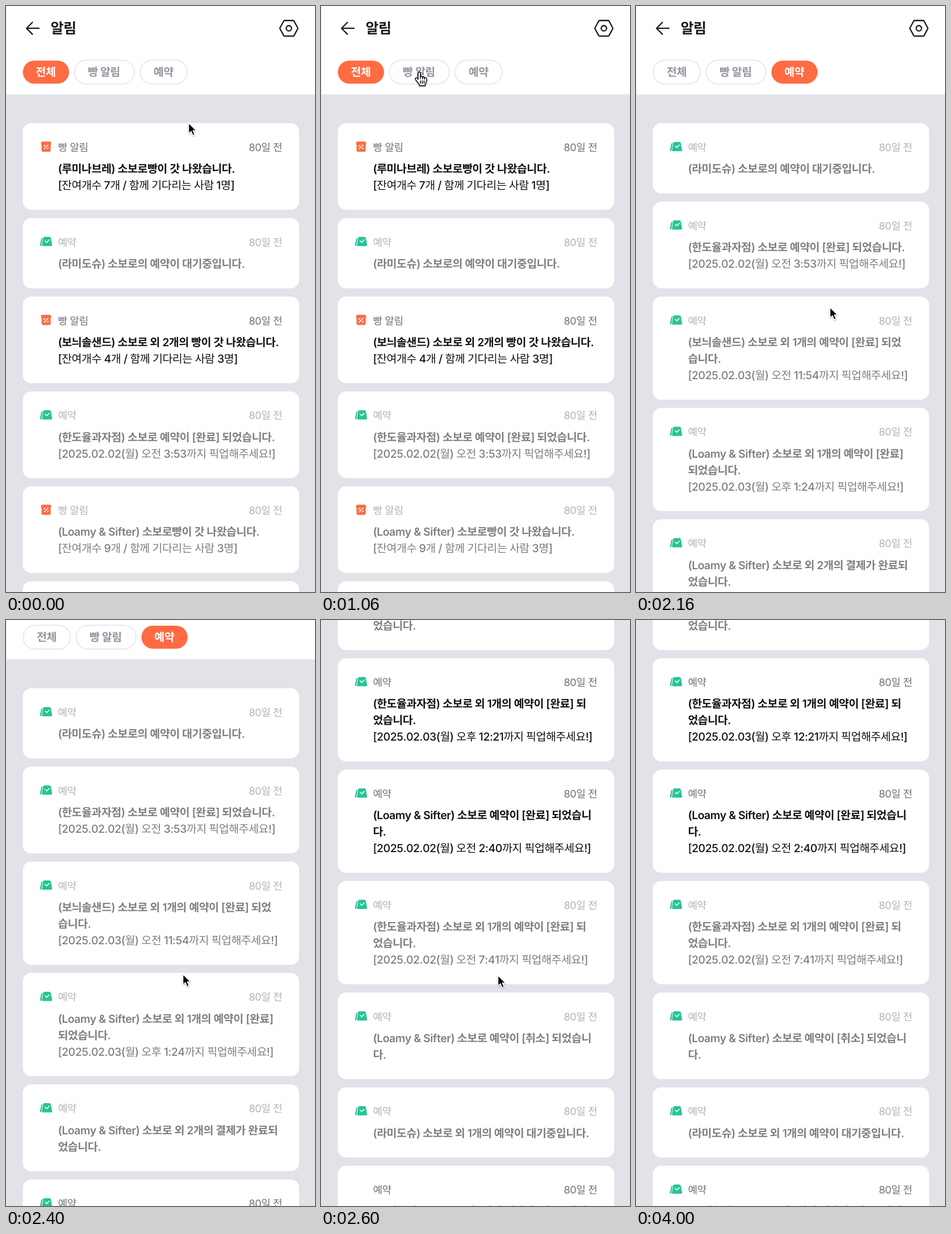
Recreate the animation shown at these times as an HTML page. Size 544 by 1030 pixels, loop 4.04 s.

```html
<!DOCTYPE html>
<html lang="ko">
<head>
<meta charset="utf-8">
<title>알림</title>
<style>
  html, body { margin: 0; width: 100%; height: 100%; overflow: hidden; background: #e2e3e9; }
  svg { display: block; }
  text {
    font-family: Inter, "Noto Sans CJK KR", "Noto Sans CJK", sans-serif;
    font-size: 19.5px; font-weight: 500; letter-spacing: -.0256em; font-kerning: none;
    text-rendering: geometricPrecision; white-space: pre; fill: #111;
  }
  .bold { font-weight: 600; }
  .head { font-size: 25.1px; font-weight: 600; fill: #191a1c; }
  .label { font-size: 18.1px; font-weight: 400; fill: #707070; }
  .read text { fill: #7f7f7f; }
  .read .label { fill: #b3b3b3; }
  .pill text { font-weight: 600; fill: #90959f; }
  .pill rect { fill: #fff; stroke: #e2e3e9; stroke-width: 1.5; }
  .pill.on text { fill: #fff; }
  .pill.on rect { fill: #ff6b42; stroke: none; }
  .ink { fill: none; stroke: #191a1c; stroke-width: 2.3; stroke-linecap: round; stroke-linejoin: round; }
  .mark { fill: none; stroke: #fff; stroke-width: 1.6; stroke-linecap: round; stroke-linejoin: round; }
  #cursor { filter: drop-shadow(0 1.5px 1.2px rgba(0, 0, 0, .35)); }
</style>
</head>
<body>
<svg width="544" height="1030" viewBox="0 0 544 1030">
  <defs>
    <g id="bread">
      <path fill="#ff6b42" d="M64.5 32.2H76.5C78.6 32.2 79.5 33.5 79.5 35.4C79.5 36.8 79.2 37.6 78.6 38.2V47.8Q78.6 50.2 76.2 50.2H65Q62.6 50.2 62.6 47.8V38.2C62 37.6 61.6 36.8 61.6 35.4C61.6 33.5 62.4 32.2 64.5 32.2Z"/>
      <path class="mark" d="M67.2 45L73.8 38.2M66.7 40.2L68.3 38.6M72.7 45L74.3 43.4"/>
    </g>
    <g id="bag" fill="#27c498">
      <path d="M64.5 34.4L62.3 47.8Q62.1 49 60.9 49Q59.5 48.8 59.8 47.3L62 37Q62.6 34.4 64.5 34.4Z"/>
      <path d="M67.4 33H76.6Q78.5 33 78.9 34.9L81.2 47Q81.5 49.3 79.3 49.3H65.2Q63 49.3 63.4 47L65.4 34.9Q65.7 33 67.4 33Z"/>
      <path class="mark" d="M69 40L71.8 42.7L76 38.3"/>
    </g>
  </defs>
  <rect width="544" height="1030" fill="#e2e3e9"/>
  <g id="page">
    <rect width="544" height="155.2" fill="#fff"/>
    <path class="ink" d="M58 39.2H36.5M46.5 28.8L36.2 39.2L46.5 49.6"/>
    <text class="head" x="78.6" y="48.4">알림</text>
    <path class="ink" d="M490.5 25.5H505.5Q506.5 25.5 507 26.3L513.5 38.2Q514 39.2 513.5 40.2L507 52.1Q506.5 52.9 505.5 52.9H490.5Q489.5 52.9 489 52.1L482.5 40.2Q482 39.2 482.5 38.2L489 26.3Q489.5 25.5 490.5 25.5Z"/>
    <circle class="ink" cx="498" cy="39.2" r="4.7"/>
  </g>
  <rect width="1" height="1030" fill="#e6e7ec"/>
  <g id="cursor">
    <path id="arrow" stroke="#fff" stroke-width="1.5" stroke-linejoin="round" d="M.5 .5V19.3L4.9 15.2L7.9 22.5L11.3 21L8.3 14H14Z"/>
    <g id="hand" stroke="#000" stroke-width="1.4" stroke-linejoin="round" stroke-linecap="round">
      <path fill="#fff" d="M-2 2A2 2 0 0 1 2 2V8.5C2.7 7.2 5.5 7.4 5.8 9.3C6.7 8.2 9 8.6 9.4 10.4C10.6 9.5 13 10.2 13 12.3V15.5C13 18 10.7 19.5 10.6 21.5V24.3H.2V22C-1.5 19.5 -4.6 16.8 -6.2 13.8C-8 11 -5.3 9 -3.6 11L-2 13Z"/>
      <path fill="none" d="M2 8.5V12M5.8 9.3V12.3M9.4 10.4V12.8M2.3 15.5V20M5.4 15.5V20M8.5 15.5V20"/>
    </g>
  </g>
</svg>
<script>
const U = 544 / 375, LOOP = 4040;
const $ = id => document.getElementById(id);
const page = $("page");

function add(parent, tag, attrs, content = "") {
  const el = document.createElementNS("http://www.w3.org/2000/svg", tag);
  for (const key in attrs) el.setAttribute(key, attrs[key]);
  el.textContent = content;
  return parent.appendChild(el);
}

// Shops
const R = "(루미나브레) 소보로", M = "(라미도슈) 소보로", B = "(보늬솔샌드) 소보로",
      H = "(한도율과자점) 소보로", L = "(Loamy & Sifter) 소보로";
const stock = (n, people) => `[잔여개수 ${n}개 / 함께 기다리는 사람 ${people}명]`;
const pickup = (day, time) => `[2025.02.0${day}(월) ${time}까지 픽업해주세요!]`;
const item = icon => (read, title, note) => ({ icon, read, title, note });
const bread = item("bread"), bag = item("bag");

const out = " 외 2개의 빵이 갓 나왔습니다.", fresh = "빵이 갓 나왔습니다.";
const first = bread(0, R + fresh, stock(7, 1));
const toast = bread(0, B + out, stock(4, 3));
const butter = bread(1, L + fresh, stock(9, 3));
const wait = bag(1, M + "의 예약이 대기중입니다.");
const done = bag(1, H + " 예약이 [완료] 되었습니다.", pickup(2, "오전 3:53"));
const split = " 외 1개의 예약이 [완료] 되었\n습니다.";
const splitH = H + " 외 1개의 예약이 [완료] 되\n었습니다.";

const lists = [
  [first, wait, toast, done, butter, bread(1, "")],
  [first, toast, butter, bread(0, R + out, stock(6, 3)), bread(0, M + out, stock(6, 5))],
  [
    wait, done,
    bag(1, B + split, pickup(3, "오전 11:54")),
    bag(1, L + " 외 1개의 예약이 [완료]\n되었습니다.", pickup(3, "오후 1:24")),
    bag(1, L + " 외 2개의 결제가 완료되\n었습니다."),
    bag(0, splitH, pickup(3, "오후 12:21")),
    bag(0, L + " 예약이 [완료] 되었습니\n다.", pickup(2, "오전 2:40")),
    bag(1, splitH, pickup(2, "오전 7:41")),
    bag(1, L + " 예약이 [취소] 되었습니\n다."),
    bag(1, M + " 외 1개의 예약이 대기중입니다."),
    bag(0, B + split, pickup(3, "오전 9:15"))
  ]
];

function drawCard(parent, { icon, read, title, note }, top) {
  const g = add(parent, "g", { transform: `translate(0 ${top})`, class: read ? "read" : "" });
  const heads = title.split("\n"), lines = note ? [...heads, note] : heads;
  const height = (65 + 20 * lines.length) * U;
  add(g, "rect", { x: 29.7, width: 486.3, height, rx: 14.5, fill: "#fff" });
  add(g, "use", { href: "#" + icon });
  add(g, "text", { x: 91.4, y: 49, class: "label" }, icon === "bread" ? "빵 알림" : "예약");
  add(g, "text", { x: 427.5, y: 49, class: "label" }, "80일 전");
  lines.forEach((line, i) =>
    add(g, "text", { x: 91.4, y: 87.2 + 20 * U * i, class: i < heads.length ? "bold" : "" }, line));
  return height + 10 * U;
}

function drawPills(parent, active) {
  let x = 29.7;
  [["전체", 81.3], ["빵 알림", 104], ["예약", 81.3]].forEach(([name, width], i) => {
    const on = i === active, edge = on ? 0 : 1.45, pad = edge / 2;
    const g = add(parent, "g", { class: on ? "pill on" : "pill" });
    add(g, "rect", { x: x + pad, y: 95.9 - pad, width: width + edge, height: 40.6 + edge, rx: 20.3 + pad });
    add(g, "text", { x: x + edge + 22.8, y: 123.4 }, name);
    x += width + 2 * edge + 8.8;
  });
}

const views = lists.map((cards, tab) => {
  const g = add(page, "g", {});
  drawPills(g, tab);
  let top = 142 * U;
  for (const card of cards) top += drawCard(g, card, top);
  return g;
});
const lateIcon = views[2].lastChild.querySelector("use");

// Pointer stops: time, x, y
const path = [
  [0, 321, 205], [250, 321, 205], [1000, 173, 116], [1250, 173, 116], [1600, 292, 116],
  [1790, 292, 116], [2140, 341, 529], [2180, 341, 529], [2350, 311, 622],
  [2460, 311, 622], [2590, 311, 624], [LOOP, 311, 624]
];

function ease(t, from, to) {
  const p = Math.min(1, Math.max(0, (t - from) / (to - from)));
  return p * p * (3 - 2 * p);
}

const show = (el, on) => { el.style.display = on ? "" : "none"; };

// 30 steps a second, each starting on a whole hundredth
function snap(t) {
  const step = Math.ceil((Math.floor(t / 10) + 1) * 3 / 10) - 1;
  return Math.floor(step * 10 / 3) * 10;
}

function render(t) {
  const tab = t < 1190 ? 0 : t < 1740 ? 1 : 2;
  views.forEach((view, i) => show(view, i === tab));
  page.setAttribute("transform", `translate(0 ${-1002 * ease(t, 2356, 2600)})`);
  show(lateIcon, t >= 3200);

  const i = path.findIndex(stop => stop[0] > t);
  const [t0, x0, y0] = path[i - 1], [t1, x1, y1] = path[i];
  const p = ease(t, t0, t1), x = x0 + (x1 - x0) * p, y = y0 + (y1 - y0) * p;
  const hover = y < 137 && x < 320;
  show($("hand"), hover);
  show($("arrow"), !hover);
  show($("cursor"), t < 2930);
  $("cursor").setAttribute("transform", `translate(${x} ${y})`);
}

const start = performance.now();
function tick() {
  render(snap((performance.now() - start) % LOOP));
  requestAnimationFrame(tick);
}
tick();
</script>
</body>
</html>
```
